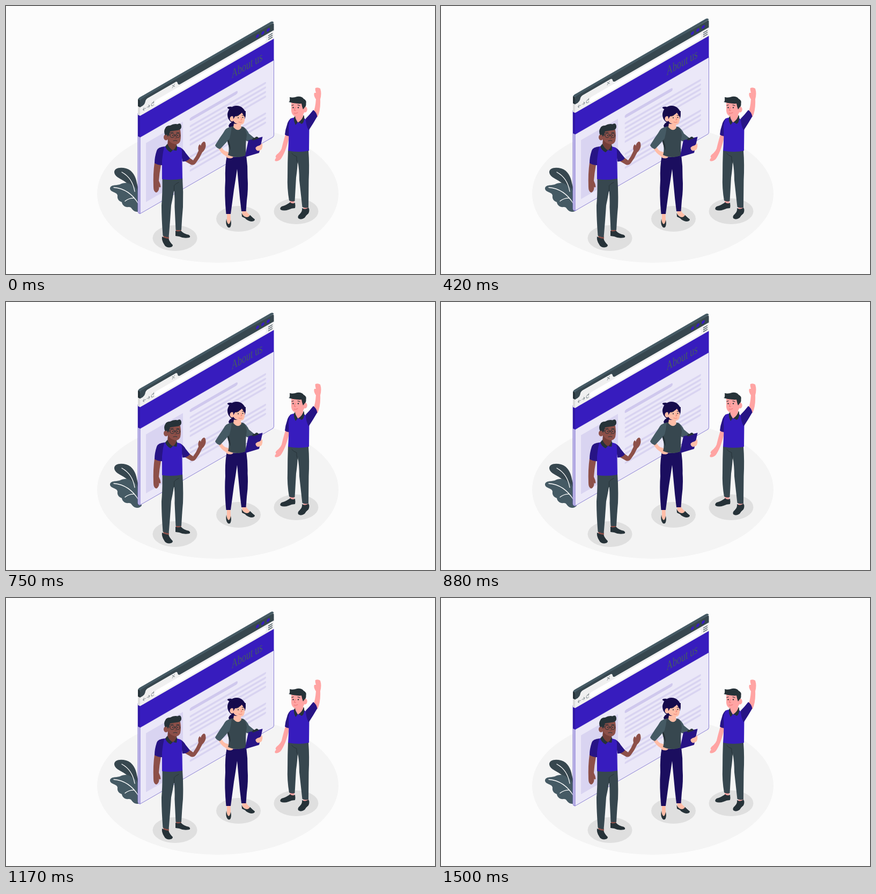
Animation of 800 by 500 pixels, one loop 1540 ms. Source, as an HTML page:

```html
<!DOCTYPE html>
<html lang="en">
<head>
<meta charset="utf-8">
<title>About us</title>
<style>
html, body { margin: 0; width: 100%; height: 100%; overflow: hidden; background: #fcfcfc; }
svg { display: block; width: 100%; height: 100%; }
.ink { fill: #263238; } .slate { fill: #37474f; } .steel { fill: #455a64; }
.violet { fill: #371cbe; } .shade { fill: #271485; } .navy { fill: #1b0e5f; } .night { fill: #160b4c; }
.brown { fill: #8d5049; } .peach { fill: #ffbda7; } .pink { fill: #ffa4a3; }
.line { fill: none; stroke-linecap: round; stroke-linejoin: round; }
</style>
</head>
<body>
<svg viewBox="0 0 800 500">
  <ellipse cx="395" cy="350" rx="225" ry="129" fill="#f4f4f4"/>
  <g fill="#dfdfdf">
    <ellipse cx="315" cy="433" rx="41.5" ry="24"/>
    <ellipse cx="433.5" cy="397" rx="41.5" ry="24"/>
    <ellipse cx="541" cy="383" rx="41.5" ry="24"/>
  </g>

  <g id="plant">
    <path class="slate" d="M248 351C241 344 234 340 227 332C220 324 204 321 202 311C201 302 213 300 224 303C237 307 242 319 244 330Q246 340 250 346Z"/>
    <path class="steel" d="M194 341C194 333 205 335 212 333C218 330 228 328 234 334C240 335 244 341 247 348L253 380Q248 386 240 383C234 380 235 375 229 375C222 376 217 372 216 366C210 364 207 359 208 354C208 347 195 348 194 341Z"/>
    <path class="line" stroke="#fff" stroke-width="1.3" d="M216 310Q236 321 240 346M201 338.5Q230 341 247 369M222 364Q230 358 239 358.5"/>
  </g>

  <g id="board">
    <path fill="#c1b9e8" stroke="#8b80d4" d="M246 200V384Q246 387 250 387.5V200Z"/>
    <path class="steel" d="M246 176Q246 172 250 170L494 29.2Q498 27.5 499.5 31L252 178Z"/>
    <path fill="#263238" d="M246 174L250 176V190L246 188Z"/>
    <path fill="#dcdcdc" d="M246 187L250 189V205L246 203Z"/>
    <path fill="#2f17a6" d="M246 203L250 205V245L246 243Z"/>
    <g transform="matrix(1 -.577 0 1 250 175)">
      <path fill="#ebe8f8" stroke="#8b80d4" d="M0 70H249.5V209.5Q249.5 212.5 246.5 212.5H0Z"/>
      <path class="slate" d="M0 15V4Q0 0 4 0H246Q249.5 0 249.5 3V15Z"/>
      <path fill="#f0f0f0" d="M0 14H5Q9 13 9.5 10Q10 5.5 14 5H65Q69 4.5 70 9Q70.5 13 74 14H249.5V30.5H0Z"/>
      <path class="violet" d="M0 30H249.5V70H0Z"/>
      <rect x="27" y="17.5" width="208" height="9.5" rx="4.7" fill="#fff"/>
      <g class="violet">
        <circle cx="219" cy="7.4" r="3"/><circle cx="229" cy="7.4" r="3"/><circle cx="239" cy="7.4" r="3"/>
      </g>
      <path class="line" stroke="#37474f" stroke-width="1.3" d="M239.5 18.500h7M239.5 22h7M239.5 25.500h7"/>
      <path class="line" stroke="#7d878c" stroke-width=".9" d="M60 7.5l4.500 5M64.5 7.500l-4.500 5M10.5 21.500h-5l2 -2.500m-2 2.500l2 2.500M13 21.500h5l-2 -2.500m2 2.500l-2 2.500M25.500 19.500a2.500 3 0 1 0 0 4M25.500 17.500v2.500h-2"/>
      <path fill="#d9d4f1" d="M11 87H80V197H11Z"/>
      <path class="line" stroke="#cfc8ed" stroke-width="6" d="M95.5 90.500H179"/>
      <path class="line" stroke="#d9d4f1" stroke-width="4" d="M94.5 103.500H233M94.500 112H233M94.500 120.500H233M94.500 129H233M94.500 137.500H160M94.500 160.500H233M94.500 169H233M94.500 177.500H233M94.500 186H150"/>
    </g>
    <text transform="matrix(.67 -.387 0 1 420.500 135)" font-family="'Liberation Serif', serif" font-size="23.800" fill="#455a64">About us</text>
  </g>

  <g id="waving-left">
    <path class="brown" d="M277 292L289 296Q286 312 285 326Q288 332 288.500 337Q287 340 285.500 337Q286 346 280 348Q275 346 275 338Q274 312 277 292Z"/>
    <path class="brown" d="M331 288L342 283L349 288Q355 280 359 270Q357 262 361 258Q363 259 363 261Q365 254 369 253Q373 253 372.500 262Q371 269 366 273Q361 284 354 293Q350 298 345 296Z"/>
    <path class="shade" d="M296 262Q283 263 281 270Q277 282 277 293Q283 297 291 297ZM325 264Q331 267 335 274L343 284Q337 291 329 290Z"/>
    <path class="brown" d="M293 427.500L304 430.500L303.500 437H294.500ZM317 416H327L326 422H317Z"/>
    <path class="ink" d="M291 430Q297 434 303 434Q305 440 311 446Q311 450 304 450.500Q297 450 294.500 444Q290 437 291 430ZM316 419Q321 422 326 419Q331 425 341 427Q345 430 342 432Q331 434 323 430L316 429Z"/>
    <path class="slate" d="M291.500 320H329Q331 347 330 375Q328 397 327 418H316.500Q315.500 397 314.500 375Q315 358 313.500 343Q311 358 308 372Q306 402 303.500 431.500Q298 431 292.500 428.500Q290 396 290 372Q292 350 291.500 320Z"/>
    <path class="line" stroke="#263238" d="M313.500 345V335Q317 331 322 329"/>
    <path class="violet" d="M296 262Q310 258 322 263Q328 264 328 270L329 322Q311 326 291 323Q291 305 291 288Q293 268 296 262Z"/>
    <path fill="#733e38" d="M302 247L319 255L316 266L309 270L301 262Z"/>
    <path class="ink" d="M301 257Q304 265 311 269L307 273Q299 269 297 262ZM318 258Q320 263 318 270L312 269Q317 265 318 258Z"/>
    <path class="brown" d="M302 234Q312 228 325 231Q327 243 325 252Q322 259 315 258Q305 256 302 247Z"/>
    <ellipse class="brown" cx="298.500" cy="245" rx="4.500" ry="5.500"/>
    <path class="ink" d="M297 241Q293 234 297 228Q299 223 306 223Q313 219 320 220.500Q326 217 327 224Q328 231 319 232Q311 233 306 234Q305 239 302 244L300 240Z"/>
    <g class="line" stroke="#263238" stroke-width="1">
      <ellipse cx="310" cy="241.500" rx="4.300" ry="4"/><ellipse cx="320.500" cy="241.500" rx="3.800" ry="4"/>
      <path d="M302 240L306 241M314 241H317M306 236.500L312 235.500M318 236L323 236.500M312 251.500Q316 250 319 251.500"/>
      <path stroke="#733e38" d="M316 242L318 247H315"/>
    </g>
    <circle class="ink" cx="311" cy="241.500" r="1.100"/><circle class="ink" cx="320" cy="241.500" r="1.100"/>
  </g>

  <g id="presenter">
    <path class="night" d="M421 217Q416 219 415 224Q417 229 424 229L430 220Z"/>
    <path class="peach" d="M412 386H418.500L419 402Q419 408 416 410L412 404ZM440 381H447.500Q449 386 456 391L452 396L441 390Z"/>
    <path class="ink" d="M411 397Q412 405 415 407Q418 406 419 399Q421 407 418.500 412Q416 415 413 412Q409 407 411 397ZM439.500 386Q442 393 449 394Q453 394 455 390Q460 395 464 398Q464 402 457 402Q449 400 446 396L440 393Z"/>
    <path class="navy" d="M412 279Q430 285 448 278Q451 299 450.500 320Q452 342 449 363L447.500 383H439Q436 360 434 336L431 304Q428 325 425 343L419 388H410.500Q407 352 409 325Q408 298 412 279Z"/>
    <path class="peach" d="M395 264L401 261Q405 271 413 272Q421 274 424 281Q422 285 416 284Q412 284 410 280Q401 275 395 264Z"/>
    <path class="steel" d="M442 225Q449 229 453 238L464 247Q459 255 449 252L442 245Z"/>
    <path class="slate" d="M422 224Q431 226 441 225Q448 229 449 241Q446 258 448 278Q432 286 414 278Q418 265 412 247Q414 230 422 224Z"/>
    <path fill="#263238" d="M415 250Q420 262 418 269Q414 259 412 249Z"/>
    <path class="steel" d="M421 225Q410 226 405 237Q397 248 390 260Q392 265 399 267Q409 257 417 247Q420 235 421 225Z"/>
    <path class="peach" d="M426 212L439 217Q437 222 439 227Q433 236 424 226Z"/>
    <path class="shade" d="M452 250.500L478.500 244L472 274L445.500 282Z"/>
    <path class="ink" d="M459 249Q461 245 464 246Q467 242 470 245L472 247L460 251Z"/>
    <path class="peach" d="M478 256Q479 262 477 267Q473 271 469 270Q465 268 465.500 264Q468 261 473 260Z"/>
    <circle class="night" cx="430" cy="203" r="17"/>
    <path class="night" d="M418 194L412.500 190Q414 187 421 188Z"/>
    <path class="peach" d="M425 206Q434 203 438 198Q443 199 445 205Q446 214 443 219Q439 223 432 220Q426 219 424 214Z"/>
    <ellipse class="peach" cx="421.500" cy="210.500" rx="4" ry="5"/>
    <path class="night" d="M424 211Q422 200 430 194L447 196Q447 203 445 207Q442 203 440 199Q434 205 427 206Z"/>
    <circle class="ink" cx="433" cy="208.500" r="1.100"/><circle class="ink" cx="441.500" cy="208" r="1.100"/>
    <path class="line" stroke="#263238" stroke-width=".9" d="M430 205.500L434 204M440 204L443 204.500"/>
    <path class="line" stroke="#ee7f70" d="M438.500 208L440 212.500H437.500M434 216.500Q437 218 440 216.500"/>
  </g>

  <g id="waving-right">
    <path class="pink" d="M521 240L529 242Q525 258 521 269Q516 281 512 286Q506 291 502 289Q500 287 504 283Q501 281 505 277Q512 272 514 266Q517 253 521 240ZM572 203Q577 190 578 174Q573 167 575 162L578 162Q576 156 577 153Q582 151 586 154Q589 163 586 174Q587 194 581 207Z"/>
    <path class="shade" d="M532 209Q526 213 524 222Q521 230 520 240Q525 244 531 242Z"/>
    <path class="pink" d="M529 363H538L537 371H530ZM554 373H564V380H555Z"/>
    <path class="ink" d="M530 366Q534 370 539 367Q540 373 539 377Q533 377 527 380Q518 383 512 380Q510 377 514 374Q524 371 530 366ZM552 377Q558 381 564 376Q567 381 564 387Q560 390 557 395Q550 400 545 396Q543 392 548 388Q553 383 552 377Z"/>
    <path class="slate" d="M526 269H564Q566 296 564.500 325L564 376Q558 378 552.500 375L547 325Q547 305 544 290Q543 307 541 320L538.500 364Q533 366 528 363Q524 340 525 318Q525 292 526 269Z"/>
    <path class="line" stroke="#263238" d="M544 293Q541 287 542 281Q536 279 533 275"/>
    <path class="violet" d="M533 209Q548 205 557 210Q565 214 565.500 226L565 270Q546 274 526 270Q528 243 527 227Q527 213 533 209Z"/>
    <path class="shade" d="M559 210Q566 203 573 194Q579 198 580.500 206Q573 219 564.500 232Q559 222 559 210Z"/>
    <path class="pink" d="M539 199L555 198Q553 204 555 210Q550 217 544 217L539 208Z"/>
    <path class="ink" d="M539 205Q540 213 544 217L540 222Q536 214 537 208ZM555 203Q558 209 554 218L551 220Q548 217 545 217Q553 212 555 203Z"/>
    <path class="pink" d="M532 180Q544 176 557 181Q559 193 555 201Q549 207 540 206Q533 204 532 196Z"/>
    <ellipse class="pink" cx="557.500" cy="193" rx="4.200" ry="5.500"/>
    <path class="ink" d="M527 179Q530 179 529 170Q535 172 543 169Q551 168 555 173Q561 176 559.500 182Q560 187 557 189L554 193Q552 188 551 182Q539 183 527 179Z"/>
    <circle class="ink" cx="535.500" cy="189.500" r="1.200"/><circle class="ink" cx="545" cy="189.500" r="1.200"/>
    <path class="line" stroke="#263238" stroke-width="1.200" d="M533 185.500L536 184.500M544 184.500L548 186"/>
    <path class="line" stroke="#ea7173" d="M539.500 189L537.500 195H540.500M537 200Q541 201 544 199"/>
  </g>
</svg>
<script>
const board = document.getElementById('board');
const LOOP = 1540, STEP = 1000 / 24, LIFT = 10, LEAD = 60;

// Linear float up and back, sampled 24 times a second.
function draw(now) {
  const time = Math.floor((now % LOOP) / STEP + 0.1) * STEP;
  const phase = ((time + LEAD) % LOOP) / LOOP;
  const rise = LIFT * (1 - Math.abs(1 - 2 * phase));
  board.setAttribute('transform', `translate(0 ${(0.78 - rise).toFixed(2)})`);
  requestAnimationFrame(draw);
}
draw(performance.now());
</script>
</body>
</html>
```
